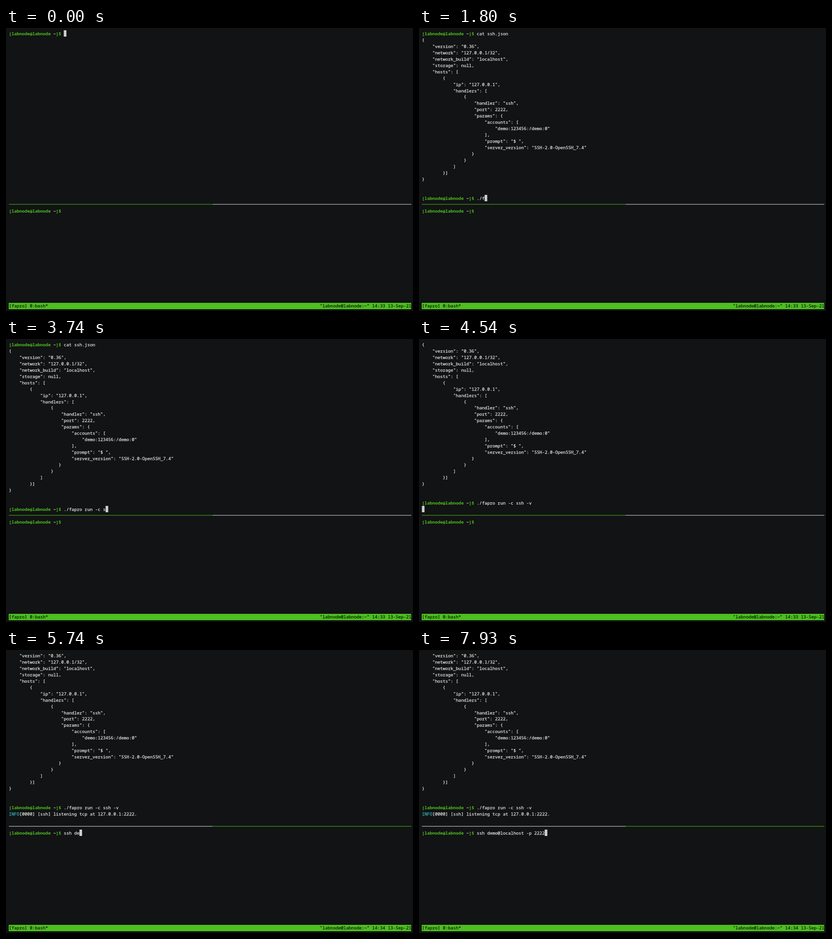
These frames come from a looping animation (898 by 624 pixels, 8 s). An HTML page with a canvas:

```html
<!DOCTYPE html>
<html lang="en">
<head>
<meta charset="utf-8">
<title>Terminal session</title>
<style>
  html, body { margin: 0; width: 100%; height: 100%; overflow: hidden; background: #121314; }
  canvas { display: block; }
</style>
</head>
<body>
<canvas id="stage" width="898" height="624"></canvas>
<script>
const ctx = document.getElementById("stage").getContext("2d");
const LOOP = 8000;
const LEFT = 6.4, TOP = 5.3, CELL_W = 5.766, CELL_H = 13.956, COLS = 154;
const FONT = '9.61px "Noto Sans Mono", "DejaVu Sans Mono", monospace';
const COLOR = {
  back: "#121314", text: "#e6e6e6", bright: "#ffffff", green: "#4dbf20",
  cyan: "#37b4c4", cursor: "#cfcfcf", status: "#0c1a06"
};
const USER = "labnode@labnode";
const PROMPT_COLS = USER.length + 6;
const LAST_TOP_ROW = 26, BORDER_ROW = 27, BOTTOM_ROW = 28, STATUS_ROW = 43;

const CONFIG = `{
    "version": "0.36",
    "network": "127.0.0.1/32",
    "network_build": "localhost",
    "storage": null,
    "hosts": [
        {
            "ip": "127.0.0.1",
            "handlers": [
                {
                    "handler": "ssh",
                    "port": 2222,
                    "params": {
                        "accounts": [
                            "demo:123456:/demo:0"
                        ],
                        "prompt": "$ ",
                        "server_version": "SSH-2.0-OpenSSH_7.4"
                   }
                }
            ]
        }]
}`.split("\n");

// A bar in the script is a hesitation that lasts one extra beat
const CAT = { script: "cat |ssh.json", start: 200, end: 1200 };
const RUN = { script: "./fapro| |run| |-|c |ssh |-v", start: 1600, end: 4270 };
const SSH = { script: "ssh |d|emo|@|localhost -|p 2|2|2|2", start: 5140, end: 7930 };
const CAT_ENTER = 1400, RUN_ENTER = 4410, LISTENING = 4610, RENAMED = 4740, SWITCHED = 4940;

function typed({ script, start, end }, t) {
  if (t < start) return "";
  const beat = (end - start) / (script.length - 1);
  const beats = 1 + Math.floor((t - start) / beat + 0.01);
  return script.slice(0, beats).replaceAll("|", "");
}

const colX = col => LEFT + col * CELL_W;
const rowY = row => TOP + row * CELL_H;

function fill(color, x, y, width, height) {
  ctx.fillStyle = color;
  ctx.fillRect(x, y, width, height);
}

function write(text, col, row, color = COLOR.text, bold = false) {
  const baseline = Math.round(rowY(row) + 10.6);
  ctx.font = (bold ? "bold " : "") + FONT;
  ctx.fillStyle = ctx.strokeStyle = color;
  ctx.lineWidth = 0.25;
  [...text].forEach((char, i) => {
    if (char === " ") return;
    ctx.fillText(char, colX(col + i), baseline);
    if (!bold) ctx.strokeText(char, colX(col + i), baseline);
  });
}

function writePrompt(row, command) {
  write("[" + USER, 0, row, COLOR.green, true);
  write("~", USER.length + 2, row, COLOR.bright, true);
  write("]$", USER.length + 3, row, COLOR.green, true);
  write(command, PROMPT_COLS, row);
}

function drawCursor(col, row) {
  fill(COLOR.cursor, colX(col), Math.round(rowY(row)), CELL_W, 14);
}

function drawTopPane(t) {
  if (t < CAT_ENTER) {
    const command = typed(CAT, t);
    writePrompt(0, command);
    drawCursor(PROMPT_COLS + command.length, 0);
    return;
  }
  const scroll = (t >= RUN_ENTER) + (t >= LISTENING);
  const command = typed(RUN, t);
  if (!scroll) writePrompt(0, typed(CAT, t));
  CONFIG.forEach((line, i) => {
    const row = i + 1 - scroll;
    if (row >= 0) write(line, 0, row);
  });
  writePrompt(LAST_TOP_ROW - scroll, command);
  if (t >= LISTENING) {
    write("INFO", 0, LAST_TOP_ROW - 1, COLOR.cyan);
    write("[0000] [ssh] listening tcp at 127.0.0.1:2222.", 4, LAST_TOP_ROW - 1);
  }
  if (t < SWITCHED) drawCursor(scroll ? 0 : PROMPT_COLS + command.length, LAST_TOP_ROW);
}

function drawBottomPane(t) {
  const command = typed(SSH, t);
  writePrompt(BOTTOM_ROW, command);
  if (t >= SWITCHED) drawCursor(PROMPT_COLS + command.length, BOTTOM_ROW);
}

function drawBorder(t) {
  const halves = [COLOR.green, COLOR.text];
  if (t >= SWITCHED) halves.reverse();
  const y = rowY(BORDER_ROW) + 6.15;
  const middle = colX(COLS / 2 + 1);
  fill(halves[0], LEFT, y, middle - LEFT, 1);
  fill(halves[1], middle, y, colX(COLS) - middle, 1);
}

function drawStatus(t) {
  const job = t >= RENAMED && t < SWITCHED ? "fapro" : "bash";
  const clock = t < RENAMED ? "14:33" : "14:34";
  const right = `"${USER}:~" ${clock} 13-Sep-21`;
  fill(COLOR.green, 6, 606, 888, 14);
  write(`[fapro] 0:${job}*`, 0, STATUS_ROW, COLOR.status);
  write(right, COLS - right.length, STATUS_ROW, COLOR.status);
}

function draw() {
  const t = performance.now() % LOOP;
  fill(COLOR.back, 0, 0, 898, 624);
  drawTopPane(t);
  drawBottomPane(t);
  drawBorder(t);
  drawStatus(t);
  requestAnimationFrame(draw);
}
draw();
</script>
</body>
</html>
```
